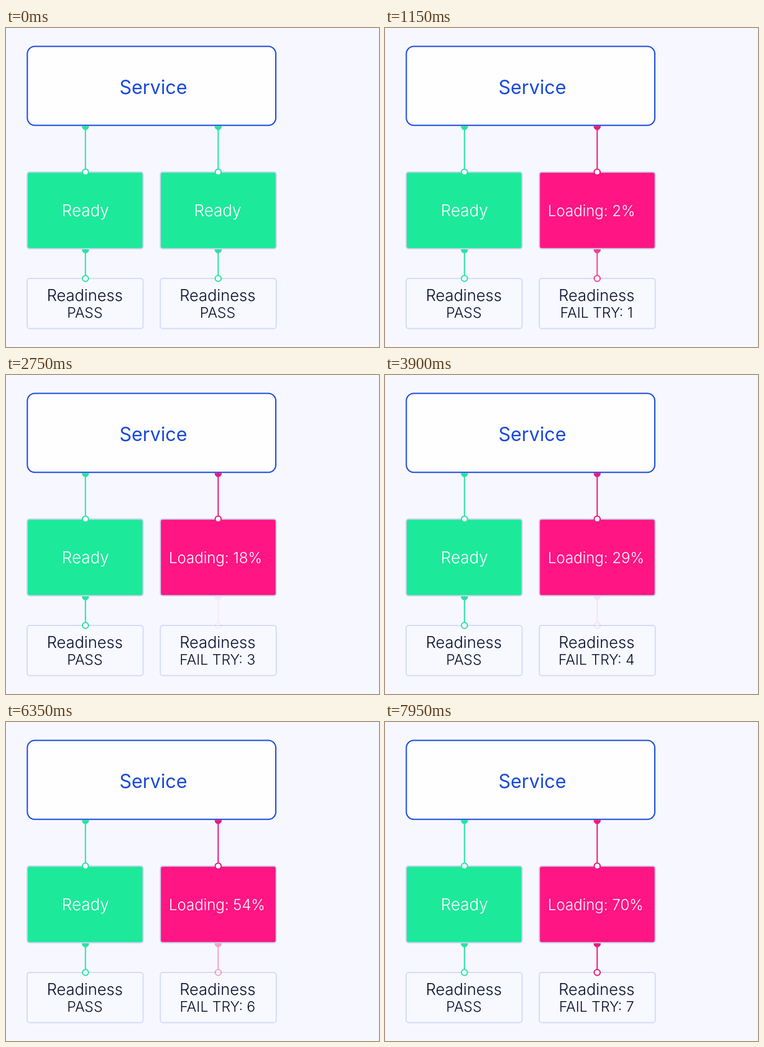
An HTML page that plays this animation: 600 px wide and 512 px high, repeating every 8 s.

```html
<!DOCTYPE html>
<html lang="en">
<head>
<meta charset="utf-8">
<title>Readiness probe</title>
<style>
  html, body { margin: 0; width: 100%; height: 100%; overflow: hidden; background: #f7f8ff; }
  svg { display: block; width: 600px; height: 512px; }
  text { font: 300 25.5px Inter, "Open Sans", sans-serif; text-anchor: middle; fill: #070d2c; }
  .title { font-size: 30.5px; font-weight: 400; fill: #1849da; }
  .pod-label { fill: #fff; font-size: 26px; }
  .loading { text-anchor: start; font-size: 24px; }
  .result { font-size: 23px; }
  .service { fill: #fefeff; stroke: #1c4bdc; stroke-width: 2; }
  .pod { fill: var(--fill); stroke: #c6d3f0; stroke-width: 2; }
  .probe { fill: #f8f9ff; stroke: #d5dcfa; stroke-width: 2; }
  .link { stroke: var(--line); fill: none; stroke-width: 2; }
  .link .plug { fill: var(--line); stroke: none; }
  .link circle { fill: #fff; }
  .ok { --fill: #1de99b; --line: #2be3a0; }
  .bad { --fill: #ff1583; --line: #ea1a7d; }
</style>
</head>
<body>
<svg viewBox="0 0 600 512">
  <rect class="service" x="34.3" y="29.5" width="399.7" height="126.8" rx="12"/>
  <text class="title" x="237" y="106">Service</text>
  <g id="pods"></g>
</svg>
<script>
const LOOP = 8000;
const RESTART = 950;          // the second pod goes down here
const PERCENT_STEP = 100;
const PROBE_START = 550, PROBE_PERIOD = 1090, PROBE_FADE = 720;

const link = (x, top, bottom) => `
  <g class="link">
    <path class="plug" d="M${x - 5.8} ${top}a5.8 6.5 0 0 0 11.6 0z"/>
    <path d="M${x} ${top}V${bottom}"/>
    <circle cx="${x}" cy="${bottom}" r="4.8"/>
  </g>`;

const column = (left, center) => `
  <g class="ok">
    <rect class="pod" x="${left}" y="231.2" width="186.5" height="123" rx="4"/>
    <rect class="probe" x="${left}" y="402" width="186.5" height="80.5" rx="4"/>
    ${link(center, 157.3, 231.2)}
    ${link(center, 355.2, 402)}
    <text class="pod-label" x="${center}" y="302">Ready</text>
    <text x="${center - 1}" y="437.7">Readiness</text>
    <text class="result" x="${center - 1}" y="465">PASS</text>
  </g>`;

const pods = document.getElementById('pods');
pods.innerHTML = column(34, 127.8) + column(248.2, 341.3);

const pod = pods.lastElementChild;
const probeLink = pod.querySelectorAll('.link')[1];
const label = pod.querySelector('.pod-label');
const result = pod.querySelector('.result');

function render(t) {
  const down = t >= RESTART;
  const probes = (t - PROBE_START) / PROBE_PERIOD;
  const phase = (probes - Math.floor(probes)) * PROBE_PERIOD;
  const percent = Math.floor((t - RESTART) / PERCENT_STEP);

  pod.setAttribute('class', down ? 'bad' : 'ok');
  label.setAttribute('class', down ? 'pod-label loading' : 'pod-label');
  label.setAttribute('x', down ? 262 : 340.5);
  label.textContent = down ? `Loading: ${percent}%` : 'Ready';
  result.textContent = down ? `FAIL TRY: ${Math.floor(probes) + 1}` : 'PASS';
  probeLink.setAttribute('opacity', down ? Math.min(1, 0.06 + (phase / PROBE_FADE) ** 1.6) : 1);
}

const start = performance.now();
function tick() {
  render((performance.now() - start) % LOOP);
  requestAnimationFrame(tick);
}
tick();
</script>
</body>
</html>
```
